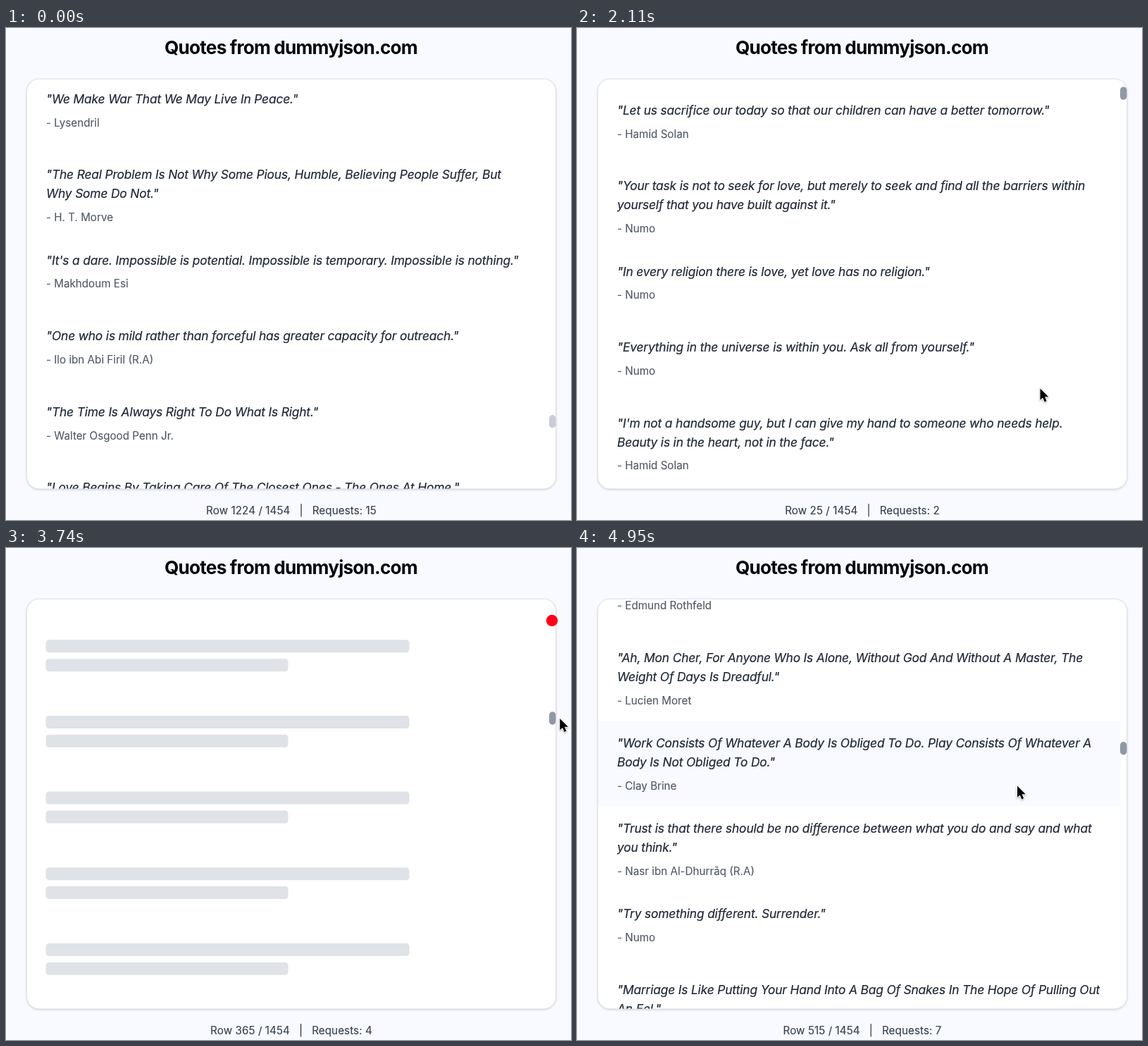
An HTML page for the animation above (5950 ms loop, 802 by 698 pixels).

```html
<!DOCTYPE html>
<html lang="en">
<head>
<meta charset="utf-8">
<title>Quotes</title>
<style>
html, body { margin: 0; width: 100%; height: 100%; overflow: hidden; background: #f8faff; }
svg { display: block; width: 802px; height: 698px; font-family: Inter, "Liberation Sans", sans-serif; }
text { white-space: pre; }
.title { font-size: 26.2px; font-weight: 700; letter-spacing: -.82px; text-anchor: middle; fill: #050608; }
.quote { font-size: 17.4px; font-style: italic; letter-spacing: -.175px; fill: #1f2937; stroke: #1f2937; stroke-width: .2; }
.by { font-size: 15.2px; fill: #535a66; stroke: #535a66; stroke-width: .15; }
.foot { font-size: 15.2px; letter-spacing: .08px; text-anchor: middle; fill: #374151; stroke: #374151; stroke-width: .15; }
.bar { fill: #dfe2e7; }
.hover { fill: #f8faff; }
.card { fill: #fff; stroke: #e1e3e8; filter: drop-shadow(0 1px 1.5px rgba(0,0,0,.16)); }
.cursor { fill: #000; stroke: #fff; stroke-width: 1.8; stroke-linejoin: round; paint-order: stroke; filter: drop-shadow(0 1px 1px rgba(0,0,0,.3)); }
</style>
</head>
<body>
<svg viewBox="0 0 802 698">
  <defs><clipPath id="clip"><rect x="30" y="72" width="750.5" height="581.4" rx="17"/></clipPath></defs>
  <rect width="802" height="698" fill="#f8faff"/>
  <text class="title" x="404.5" y="37.2">Quotes from dummyjson.com</text>
  <rect class="card" x="29.5" y="72.3" width="751" height="581.5" rx="17.5"/>
  <g id="list" clip-path="url(#clip)"></g>
  <rect id="thumb" x="771" width="9.4" height="18.4" rx="4.7"/>
  <text id="foot" class="foot" x="405" y="689.5"></text>
  <circle id="dot" cx="775" cy="103" r="8.2" fill="#ff0019"/>
  <path id="cursor" class="cursor" d="M0 0V16.3L3.7 12.9 6.3 18.9 9.1 17.7 6.6 11.8H11.7Z"/>
</svg>
<script>
const $ = id => document.getElementById(id);
const LOOP = 5950, TOP = 73, LINE = 26.9, ROW = 107.6, TALL = 121.1;
const START = 1580, STEP = 52.5, NB = '\u00a0';

// One row per line: quote, "|" for a line break, "~" before the author.
const parse = s => s.trim().split('\n').map(l => {
  const [q, by] = l.split('~');
  return { lines: `"${q}"`.split('|'), by };
});

const first = parse(`
Your heart is the size of an ocean. Go find yourself in its hidden depths.~Numo
The Bay of Bengal is hit frequently by cyclones. The months of November and May,|in particular, are dangerous in this regard.~Hamid Solan
Thinking is the capital, Enterprise is the way, Hard Work is the solution.~Hamid Solan
If You Can'T Make It Good, At Least Make It Look Good.~Neil Dorts
Heart be brave. If you cannot be brave, just go. Love's glory is not a small thing.~Numo
It is bad for a young man to sin, but it is worse for an old man to sin.~Abu Farn (R.A)
While children are struggling to be unique, the world around them is trying all|means to make them look like everybody else.~Hamid Solan
These Capitalists Generally Act Harmoniously And In Concert, To Fleece The|People.~Solomon Hartwin
I Don'T Believe In Failure. It Is Not Failure If You Enjoyed The Process.~Leona Dunbrey
Do not get elated at any victory, for all such victory is subject to the will of God.~Abu Farn (R.A)
Wear gratitude like a cloak and it will feed every corner of your life.~Numo
If you even dream of beating me you'd better wake up and apologize.~Makhdoum Esi`);

const middle = parse(`
Let us sacrifice our today so that our children can have a better tomorrow.~Hamid Solan
Your task is not to seek for love, but merely to seek and find all the barriers within|yourself that you have built against it.~Numo
In every religion there is love, yet love has no religion.~Numo
Everything in the universe is within you. Ask all from yourself.~Numo
I'm not a handsome guy, but I can give my hand to someone who needs help.|Beauty is in the heart, not in the face.~Hamid Solan`);

const later = parse(`
Trust is that there should be no difference between what you do and say and what|you think.~Desmond Thornhill
Goodbyes are only for those who love with their eyes. Because for those who love|with heart and soul there is no such thing as separation.~Numo
The best revenge is to improve yourself.~Ilo ibn Abi Firil (R.A)
God gave me this illness to remind me that I'm not Number One; He is.~Makhdoum Esi
Success Is A Personal Standard, Reaching For The Highest That Is In Us, Becoming|All That We Can Be.~Bix Toller
When You Have Really Exhausted An Experience You Always Reverence And Love|It.~Lucien Moret`);

const deep = parse(`
Try something different. Surrender.~Edmund Rothfeld
Ah, Mon Cher, For Anyone Who Is Alone, Without God And Without A Master, The|Weight Of Days Is Dreadful.~Lucien Moret
Work Consists Of Whatever A Body Is Obliged To Do. Play Consists Of Whatever A|Body Is Not Obliged To Do.~Clay Brine
Trust is that there should be no difference between what you do and say and what|you think.~Nasr ibn Al-Dhurrāq (R.A)
Try something different. Surrender.~Numo
Marriage Is Like Putting Your Hand Into A Bag Of Snakes In The Hope Of Pulling Out|An Eel.~Solomon Hartwin`);

const far = parse(`
We Make War That We May Live In Peace.~Lysendril
The Real Problem Is Not Why Some Pious, Humble, Believing People Suffer, But|Why Some Do Not.~H. T. Morve
It's a dare. Impossible is potential. Impossible is temporary. Impossible is nothing.~Makhdoum Esi
One who is mild rather than forceful has greater capacity for outreach.~Ilo ibn Abi Firil (R.A)
The Time Is Always Right To Do What Is Right.~Walter Osgood Penn Jr.
Love Begins By Taking Care Of The Closest Ones - The Ones At Home.~Numo`);

// Loaded part of the list; the gaps cycle through the other quotes.
const pool = [...far, ...deep, ...first];
const rows = Array.from({ length: 60 }, (_, i) =>
  first[i] || middle[i - 26] || later[i - 48] || pool[i * 7 % pool.length]);
const height = r => r && r.lines.length > 1 ? TALL : ROW;
const tops = [0];
for (let i = 0; i < 530; i++) tops.push(tops[i] + height(rows[i]));

const S1 = tops[6] + 16, S2 = tops[26] - 12, S3 = tops[49] - 24.4, S4 = tops[513] + 84.6;

const clamp = x => Math.max(0, Math.min(1, x));
const span = (t, a, b) => clamp((t - a) / (b - a));
const mix = (a, b, u) => a + (b - a) * u;
const smooth = u => u * u * (3 - 2 * u);

function scrollAt(t) {
  if (t < 1737.5) return S1 * span(t, 1527.5, 1737.5) ** 3;
  if (t < 2105) return mix(S1, S2, 1 - (1 - span(t, 1737.5, 2105)) ** 1.5);
  if (t < 3160) return mix(S2, S3, smooth(span(t, 2105, 2735)));
  return mix(S3, S4, smooth(span(t, 3160, 3995)));
}
const rowAt = s => tops.findIndex(y => y > s);
const thumbAt = s => TOP + s * 202 / S4;

function cursorAt(t) {
  if (t < 2800) {
    const u = smooth(span(t, 2480, 2787));
    return [mix(657.5, 775.3, u), mix(511.5, 121, u)];
  }
  if (t < 3200) return [775.3, mix(121, 94, smooth(span(t, 2787, 3050)))];
  if (t < 4050) {
    const s = scrollAt(t);
    return [775 + 13 * Math.sin(Math.PI * span(t, 3207, 3995)), 102.5 + thumbAt(s) - thumbAt(S3)];
  }
  const u = 1 - (1 - span(t, 4047.5, 4520)) ** 2;
  return [mix(775, 625, u), mix(283.5, 337.5, u)];
}

const bar = (y, w) => `<rect class="bar" x="56.5" y="${y}" width="${w}" height="18" rx="4.5"/>`;
const label = (cls, y, s) => `<text class="${cls}" x="57" y="${y}">${s}</text>`;

function drawRow(r, y, hover) {
  if (!r) return bar(y + 18, 516) + bar(y + 18 + LINE, 344);
  const back = hover ? `<rect class="hover" x="30" y="${y}" width="741.5" height="${height(r)}"/>` : '';
  const text = r.lines.map((l, i) => label('quote', y + 37.8 + i * LINE, l)).join('');
  return back + text + label('by', y + 43.7 + r.lines.length * LINE, '- ' + r.by);
}

function drawRows(list, y, hover) {
  return list.map((r, i) => {
    const part = drawRow(r, y, i === hover);
    y += height(r);
    return part;
  }).join('');
}

function drawScroll(s) {
  const i = rowAt(s) - 1;
  const shown = Array.from({ length: 8 }, (_, n) => rows[i + n]);
  return drawRows(shown, TOP + tops[i] - s, -1);
}

function scene(t) {
  if (t < 50) return { list: drawRows(far, 69, -1), thumb: 549, row: 1224, req: 15 };
  if (t < START) {
    const list = t < 530 ? Array(6).fill(null) : first.slice(0, 6);
    return {
      list: drawRows(list, TOP, t < 890 ? -1 : 3), thumb: TOP, dark: t >= 840,
      row: 1, req: 1, cursor: t >= 890 && cursorAt(0)
    };
  }
  const k = Math.floor((t - START) / STEP + 1e-6), q = START + k * STEP, s = scrollAt(q);
  const row = rowAt(scrollAt(q - STEP));
  const ready = k >= 63;
  return {
    list: ready ? drawRows(deep, 16.6, k > 63 ? 2 : -1) : drawScroll(s),
    thumb: thumbAt(s), dark: true,
    row: k > 63 ? 515 : row,
    req: ready ? 7 : k >= 55 ? 6 : Math.min(4, 1 + Math.floor((row + 12) / 20)),
    cursor: cursorAt(q),
    dot: k >= 31 && k < 48
  };
}

let last = '';
function render(t) {
  const v = scene(t);
  if (v.list !== last) $('list').innerHTML = last = v.list;
  $('thumb').setAttribute('y', v.thumb);
  $('thumb').setAttribute('fill', v.dark ? '#9097a5' : '#c8cdd6');
  const gap = NB.repeat(3);
  $('foot').textContent = `Row ${v.row} / 1454${gap}|${gap}Requests: ${v.req}`;
  $('dot').setAttribute('visibility', v.dot ? 'visible' : 'hidden');
  $('cursor').setAttribute('visibility', v.cursor ? 'visible' : 'hidden');
  if (v.cursor) $('cursor').setAttribute('transform', `translate(${v.cursor})`);
}

const begin = performance.now();
function tick() {
  render((performance.now() - begin) % LOOP);
  requestAnimationFrame(tick);
}
tick();
</script>
</body>
</html>
```
